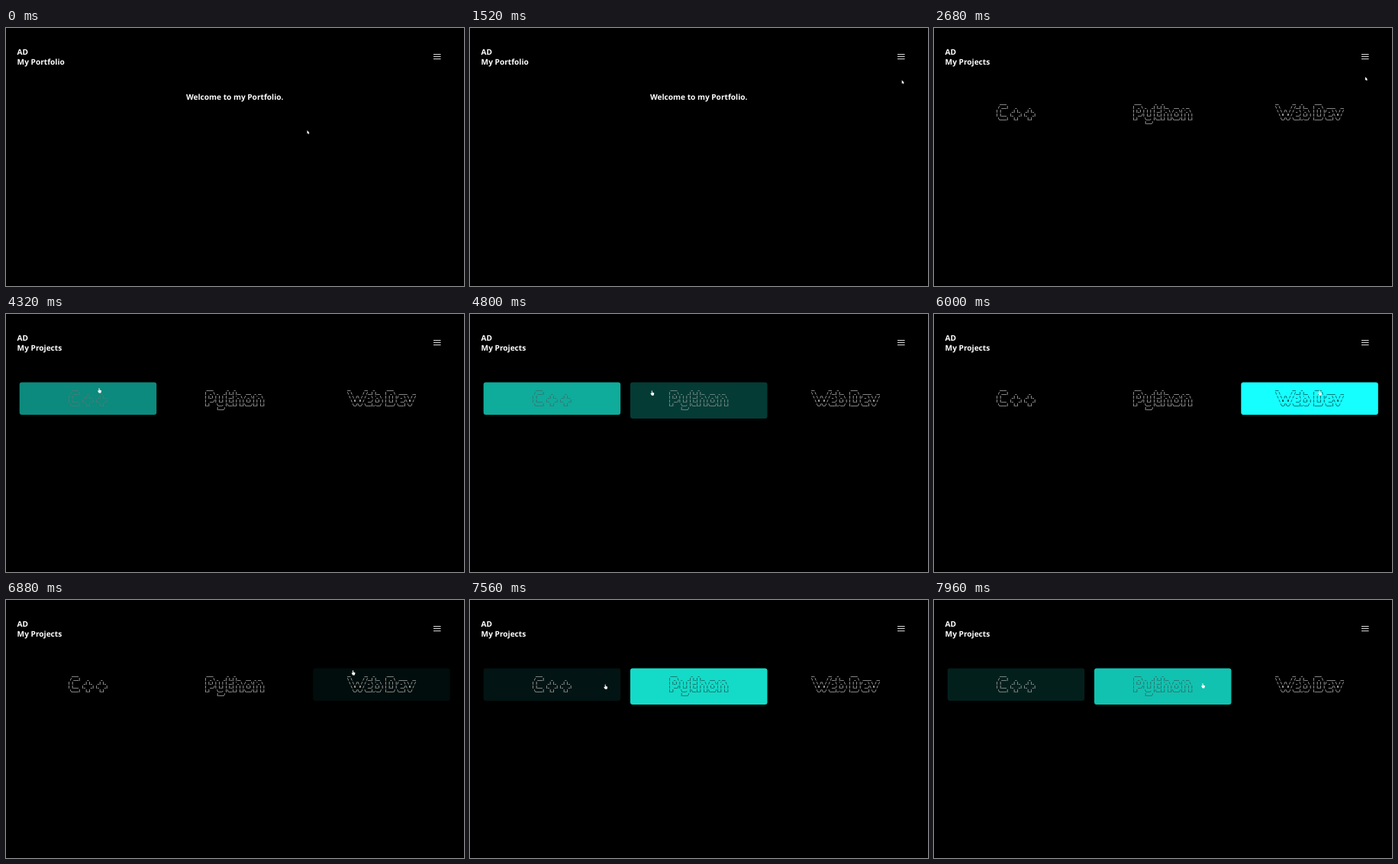
An HTML page for the animation above (8000 ms loop, 600x338 px).

```html
<!DOCTYPE html>
<html lang="en">
<head>
<meta charset="utf-8">
<title>Portfolio</title>
<style>
  html, body { margin: 0; width: 100%; height: 100%; overflow: hidden; background: #000; }
  svg { display: block; width: 100vw; height: 100vh; }
  text { text-rendering: geometricPrecision; white-space: pre; }
  .label { font: 700 10.13px "Open Sans", sans-serif; fill: #fff; }
  .art { font: 700 3.74px "DejaVu Sans Mono", monospace; stroke-width: .12; }
</style>
</head>
<body>
<svg viewBox="0 0 600 338">
  <text class="label" x="14.6" y="34.5">AD</text>
  <text class="label" id="title" x="14.6" y="48"></text>
  <path d="M560 34.5h9.6M560 37.5h9.6M560 40.5h9.6" stroke="#fff" stroke-width=".85"/>
  <text class="label" id="welcome" x="299.7" y="94.2" text-anchor="middle">Welcome to my Portfolio.</text>
  <g id="cards"></g>
  <g id="pointer" fill="#fff">
    <path id="arrow" d="M0 0V4.6L1.1 3.7L1.8 5.2L2.6 4.8L1.9 3.4H3.2Z"/>
    <path id="hand" d="M-.5 .4Q0-.4 .5 .4V2.4L2.6 3Q3 3.2 2.9 4L2.3 6.4H-.3L-1.9 3.8Q-1.6 3-.5 3.7Z"/>
  </g>
</svg>
<script>
const LOOP = 8000, STEP = 40, FADE = 500, PAGE_SWAP = 2400;
const ROW = 5, COLUMN = 2.25, CARD_TOP = 89.4, CARD_WIDTH = 179.5, CARD_PITCH = 192.3;
const $ = id => document.getElementById(id);

const lettering = [String.raw`
  ____                 
 / ___|    _       _   
| |      _| |_   _| |_ 
| |___  |_   _| |_   _|
 \____|   |_|     |_|  `, String.raw`
 ____        _   _                 
|  _ \ _   _| |_| |__   ___  _ __  
| |_) | | | | __| '_ \ / _ \| '_ \ 
|  __/| |_| | |_| | | | (_) | | | |
|_|    \__, |\__|_| |_|\___/|_| |_|
       |___/                       `, String.raw`
__        __   _       ____             
\ \      / /__| |__   |  _ \  _____   __
 \ \ /\ / / _ \ '_ \  | | | |/ _ \ \ / /
  \ V  V /  __/ |_) | | |_| |  __/\ V / 
   \_/\_/ \___|_.__/  |____/ \___| \_/  `];

// Pointer turning points: time, x, y.
const turns = [
  [80, 394.5, 134], [760, 565, 38], [1200, 566, 70], [2320, 565, 64],
  [2960, 565, 64], [3760, 161, 56], [4045, 134, 89.4], [4320, 122, 97],
  [5360, 374, 104], [6000, 505, 100], [6700, 454, 75], [6880, 454.5, 92],
  [6960, 389, 102], [7490, 209, 110], [7675, 125, 111], [7960, 352, 109],
];

const clamp = v => Math.max(0, Math.min(1, v));

function make(parent, tag, attributes, content = "") {
  const node = document.createElementNS("http://www.w3.org/2000/svg", tag);
  for (const key in attributes) node.setAttribute(key, attributes[key]);
  node.textContent = content;
  return parent.appendChild(node);
}

function pointerAt(t) {
  const i = Math.max(1, turns.findIndex(turn => turn[0] > t));
  const end = t >= turns.at(-1)[0] ? turns.length - 1 : i;
  const [a, b] = [turns[end - 1], turns[end]];
  const k = clamp((t - a[0]) / (b[0] - a[0]));
  return { x: a[1] + (b[1] - a[1]) * k, y: a[2] + (b[2] - a[2]) * k };
}

function makeCard(art, index) {
  const rows = art.slice(1).split("\n");
  const x = 17.7 + index * CARD_PITCH, height = 17.5 + rows.length * 5;
  const box = make($("cards"), "rect", { x, y: CARD_TOP, width: CARD_WIDTH, height, rx: 3 });
  const text = make($("cards"), "g", { class: "art" });
  const left = x + (CARD_WIDTH - rows[0].length * COLUMN) / 2;
  rows.forEach((row, i) => make(text, "text", { x: left, y: 100.1 + i * ROW }, row));

  const contains = p => p.x > x && p.x < x + CARD_WIDTH && p.y > CARD_TOP && p.y < CARD_TOP + height;
  return { box, text, contains, levels: hoverLevels(contains) };
}

// The glow rises while the pointer is inside a card and falls while it is outside.
function hoverLevels(contains) {
  const tick = 5, levels = [];
  let level = 0;
  for (let t = 0; t < LOOP; t += tick) {
    if (t % STEP === 0) levels.push(level);
    const inside = t >= PAGE_SWAP && contains(pointerAt(t));
    level = clamp(level + (inside ? tick : -tick) / FADE);
  }
  return levels;
}

const cards = lettering.map(makeCard);

function draw(frame) {
  const t = frame * STEP, projects = t >= PAGE_SWAP;
  $("title").textContent = projects ? "My Projects" : "My Portfolio";
  $("welcome").style.display = projects ? "none" : "";
  $("cards").style.display = projects ? "" : "none";

  for (const { box, text, levels } of cards) {
    const level = levels[frame], ink = 255 * (1 - level);
    const blue = 232 * level + 23 * clamp(level * 10 - 9);
    const color = `rgb(${ink},${ink},${ink})`;
    box.setAttribute("fill", `rgb(${22 * level},${255 * level},${blue})`);
    text.setAttribute("fill", color);
    text.setAttribute("stroke", color);
  }

  const p = pointerAt(t);
  const onMenu = Math.abs(p.x - 565) < 7 && Math.abs(p.y - 38) < 6;
  const linked = onMenu || projects && cards.some(card => card.contains(p));
  $("pointer").setAttribute("transform", `translate(${p.x} ${p.y})`);
  $("arrow").style.display = linked ? "none" : "";
  $("hand").style.display = linked ? "" : "none";
}

const start = performance.now();
function tick() {
  draw(Math.floor((performance.now() - start) % LOOP / STEP));
  requestAnimationFrame(tick);
}
tick();
</script>
</body>
</html>
```
